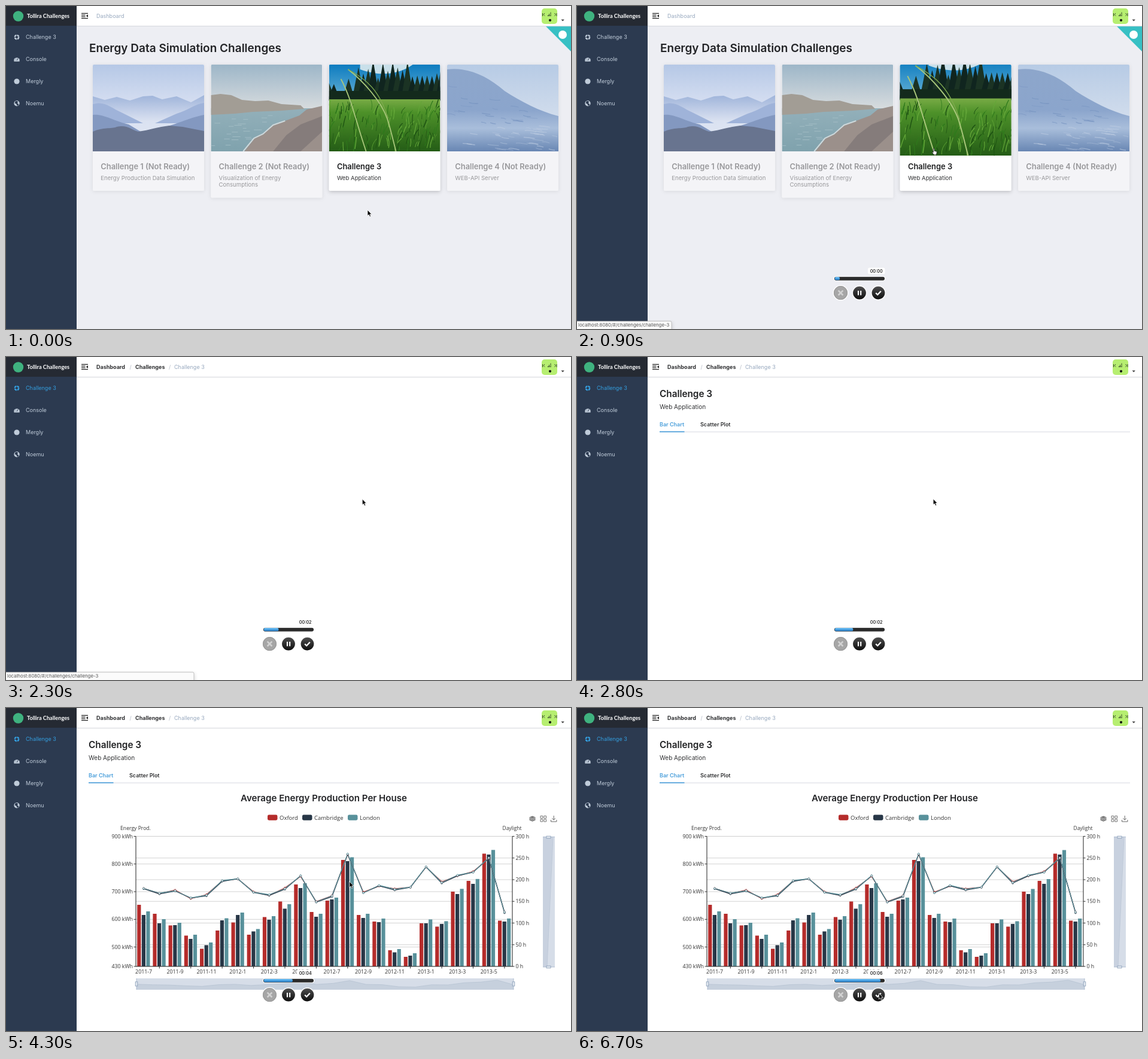
Recreate the animation shown at these times as an HTML page. Size 944x540 px, loop 6800 ms.

```html
<!DOCTYPE html>
<html lang="en">
<head>
<meta charset="utf-8">
<title>Energy dashboard</title>
<style>
html, body { margin: 0; width: 100%; height: 100%; overflow: hidden; background: #fff; }
svg { display: block; width: 944px; height: 540px; font-family: Inter, "Noto Sans CJK JP", sans-serif; }
.chart text { font-family: "Open Sans", sans-serif; }
</style>
</head>
<body>
<svg id="stage" viewBox="0 0 944 540" xmlns="http://www.w3.org/2000/svg"></svg>
<script>
const LOOP = 6800, STEP = 100;
const CHART_START = 2920, PAGE_SWAP = 2100, PAGE_IN = 2600;
const RED = '#b52c2b', NAVY = '#283747', TEAL = '#58919b';
const $ = id => document.getElementById(id);
const clamp = (v, a = 0, b = 1) => Math.min(b, Math.max(a, v));
const range = n => [...Array(n).keys()];

let seed = 7;
const rnd = (a = 0, b = 1) => {
  seed = (seed * 16807) % 2147483647;
  return a + (b - a) * seed / 2147483647;
};

// ---- markup helpers
const text = (x, y, str, size, fill, weight = 400, more = '') =>
  `<text x="${x}" y="${y}" font-size="${size}" fill="${fill}" font-weight="${weight}" ${more}>${str}</text>`;
const rect = (x, y, w, h, fill, more = '') =>
  `<rect x="${x}" y="${y}" width="${w}" height="${h}" fill="${fill}" ${more}/>`;
const circle = (x, y, r, fill, more = '') => `<circle cx="${x}" cy="${y}" r="${r}" fill="${fill}" ${more}/>`;
const path = (d, fill, more = '') => `<path d="${d}" fill="${fill}" ${more}/>`;
const line = (d, stroke, w = 1, more = '') => path(d, 'none', `stroke="${stroke}" stroke-width="${w}" ${more}`);
const group = (id, body, more = '') => `<g id="${id}" ${more}>${body}</g>`;
const gradient = (id, ...stops) =>
  `<linearGradient id="${id}" x1="0" y1="0" x2="0" y2="1">${stops.map(([o, c]) =>
    `<stop offset="${o}" stop-color="${c}"/>`).join('')}</linearGradient>`;
const clip = (id, x, y, w, h, more = '') => `<clipPath id="${id}">${rect(x, y, w, h, '#000', more)}</clipPath>`;
const shade = (id, dy, blur, alpha) =>
  `<filter id="${id}" x="-10%" y="-10%" width="120%" height="125%"><feDropShadow dx="0" dy="${dy}" stdDeviation="${blur}" flood-opacity="${alpha}"/></filter>`;

const defs = `<defs>
${gradient('haze', [0, '#b5c8e6'], [.4, '#d2dcf0'], [.75, '#dde4f2'], [1, '#aab8d4'])}
${gradient('mist', [0, '#9fb4da'], [1, '#dbe2f1'])}
${gradient('coastSky', [0, '#9db6c8'], [1, '#dcdfe0'])}
${gradient('sea', [0, '#93b0ba'], [1, '#7fa2ad'])}
${gradient('meadow', [0, '#78ab45'], [.25, '#4d9129'], [1, '#245c16'])}
${gradient('skyBlue', [0, '#0d7cc0'], [1, '#6db4d6'])}
${gradient('paleSky', [0, '#b7cbe5'], [1, '#e2e8f1'])}
${gradient('wave', [0, '#8da6cb'], [.5, '#8ba5cc'], [.72, '#a9bedb'], [1, '#6886b3'])}
${gradient('knob', [0, '#505050'], [1, '#0c0c0c'])}
${gradient('fillBlue', [0, '#6ec4fa'], [1, '#2279c4'])}
${clip('pic', 0, 0, 186, 145)}
${clip('reveal', 217, 190, 0, 260)}
${[211, 222.5].map(h => clip('card' + Math.floor(h), 0, 0, 186, h, 'rx="2"')).join('')}
${shade('soft', 1, 3, .09)}${shade('lift', 2, 3, .2)}
</defs>`;

// ---- sidebar and top bar
const menuIcon = {
  ring: c => circle(18, 52, 3.2, 'none', `stroke="${c}" stroke-width="2.4" stroke-dasharray="4 1.03"`),
  gauge: c => path('M13.4 92.8A4.9 4.9 0 1 1 22.6 92.8Z', c) + line('M18 91L20 87.5M15 90h.6M16 87.3h.6', '#2c3a50', 1),
  globe: c => circle(18, 162.8, 4.7, c) + path('M16 158.5l4 1-1 3 2.6 2.5-2.6 2-2-3.5-2.4-1Z', '#2c3a50')
};
const menu = color => menuIcon.ring(color) + text(33, 55.4, 'Challenge 3', 9, color);
const SIDE = '#bfcbd9';
const sidebar = rect(0, 0, 118, 540, '#2c3a50') + rect(0, 0, 118, 33, '#252a33') +
  circle(20.5, 17, 8.7, '#3fb27f') +
  text(35, 20, 'Tollira Challenges', 9.2, '#fff', 700, 'style="font-family:Lato,sans-serif"') +
  group('menuIdle', menu(SIDE)) + group('menuOn', menu('#349fe0')) +
  menuIcon.gauge(SIDE) + text(33, 92.4, 'Console', 9, SIDE) +
  circle(18, 126, 4.6, SIDE) + text(33, 129.3, 'Mergly', 9, SIDE) +
  menuIcon.globe(SIDE) + text(33, 166.1, 'Noemu', 9, SIDE);

const crumb = text(151, 20, 'Dashboard', 9, '#303133', 700) + text(206.5, 20, '/', 9, '#b4bac6') +
  text(216, 20, 'Challenges', 9, '#303133', 700) + text(272, 20, '/', 9, '#b4bac6') +
  text(281, 20, 'Challenge 3', 9, '#97a8be');
const avatar = rect(895, 4, 26, 26, '#b6ee70', 'rx="5"') +
  line('M896.5 12v5M900 12l-2 2.5 2 2M905.5 15.5v1.5M907.5 13v3M910 10.5v5M905 16.2h6M916.5 12l2 2.5-2 2M920 12v5', '#2c3a26', .9) +
  circle(909, 23.8, 2.1, '#111');
const topbar = rect(118, 0, 826, 33, '#fff') + rect(118, 33, 826, 1.2, '#d9dbe0') +
  line('M126 12.3H137M126 15.1H132.5M126 17.9H132.5M126 20.7H137', '#222', 1.3) +
  path('M137 13.9V19.1L133.8 16.5Z', '#222') +
  group('crumbHome', text(151, 20, 'Dashboard', 9, '#97a8be')) + group('crumbPage', crumb) +
  avatar + path('M927.5 22.5h5.4l-2.7 3Z', '#444');

// ---- simplified card pictures, 186 x 145 each
const hills = () => rect(0, 0, 186, 145, 'url(#haze)') +
  path('M0 53L20 59 40 54 62 60 84 53 100 52 116 58 140 53 164 63 186 51V95H0Z', 'url(#mist)') +
  path('M0 66C20 60 30 72 48 80L84 98H0ZM186 64C170 66 160 76 140 82L104 98H186Z', '#9fb3d9') +
  path('M0 84C18 82 34 94 60 100L80 112H0ZM186 84C164 88 150 96 122 104L96 112H186Z', '#8398c0') +
  path('M0 112C18 104 30 108 40 104C58 100 62 108 76 112C94 110 104 105 128 102L150 104 186 111V145H0Z', '#68748f');
const coast = () => rect(0, 0, 186, 80, 'url(#coastSky)') + rect(0, 73, 186, 72, 'url(#sea)') +
  path('M0 51L16 49 34 51 52 59 74 61 96 60 118 66 150 68 156 74 118 77 70 79 40 82 0 84Z', '#a29d95') +
  range(26).map(() => { const x = rnd(0, 105), y = rnd(82, 140);
    return line(`M${x} ${y}h${rnd(4, 14)}`, '#a8c0c8', .8); }).join('') +
  path('M186 69L160 75 148 85 124 94 104 100 88 115 74 122 56 145H186Z', '#9b908b') +
  line('M124 94L104 101 87 116 72 123 54 145', '#cdd8db', 2) +
  path('M186 86L150 100 126 118 104 145H150L186 112Z', '#857c7b');
const grass = () => rect(0, 0, 186, 62, 'url(#skyBlue)') +
  path('M52 0H140C120 14 90 22 52 8Z', '#c9e0ea') +
  range(24).map(i => { const x = i * 8.2, h = rnd(2, 34) - (x > 70 ? 12 : 0) + (x < 45 ? 18 : 0);
    return path(`M${x} ${h}L${x + 11} 60H${x - 11}Z`, i % 2 ? '#10251f' : '#1b3324'); }).join('') +
  rect(0, 44, 186, 16, '#132a1c') + rect(0, 58, 186, 87, 'url(#meadow)') +
  range(150).map(i => { const x = rnd(-5, 186), y = rnd(74, 150), h = rnd(8, 22);
    return line(`M${x} ${y}q${rnd(-1, 3)} ${-h / 2} ${rnd(-3, 8)} ${-h}`, ['#2f7a1c', '#63a738', '#1d5212'][i % 3], rnd(.6, 1.5)); }).join('') +
  line('M20 24C38 58 44 92 62 145M32 8C58 28 88 62 98 92C104 112 108 130 112 145', '#a9c77b', 1.8) +
  line('M32 8C62 24 84 42 99 90', '#7fa94f', 1.2);
const surf = () => rect(0, 0, 186, 145, 'url(#paleSky)') +
  path('M0 8C34 4 66 18 96 44C124 62 154 78 186 86V145H0Z', 'url(#wave)') +
  range(60).map(() => { const x = rnd(0, 180), y = rnd(18 + x * .48, 142);
    return line(`M${x} ${y}q5 ${rnd(-2, 3)} ${rnd(8, 20)} 2`, y > 100 ? '#bccce2' : '#7491bf', rnd(.6, 1.6), 'opacity=".6"'); }).join('');

const cards = [
  [145, 211, 'Challenge 1 (Not Ready)', ['Energy Production Data Simulation'], hills],
  [342.3, 222.5, 'Challenge 2 (Not Ready)', ['Visualization of Energy', 'Consumptions'], coast],
  [539.6, 211, 'Challenge 3', ['Web Application'], grass],
  [737, 211, 'Challenge 4 (Not Ready)', ['WEB-API Server'], surf]
].map(([x, h, title, lines, photo], i) => {
  const on = i === 2;
  return `<g transform="translate(${x} 98)">` +
    rect(0, 0, 186, h, on ? '#fff' : '#f4f4f7', `rx="2" filter="url(#${on ? 'lift' : 'soft'})"`) +
    `<g clip-path="url(#card${Math.floor(h)})"><g id="photo${i}"><g clip-path="url(#pic)">${photo()}</g></g></g>` +
    text(13.3, 174.5, title, 12.9, on ? '#1f2022' : '#98989b', 600) +
    lines.map((s, k) => text(13.3, 193 + k * 11, s, 9.6, on ? '#303133' : '#98989b')).join('') + '</g>';
}).join('');

const home = rect(118, 33, 826, 507, '#edeef3') +
  text(139, 76.5, 'Energy Data Simulation Challenges', 19, '#222326', 600) + cards +
  path('M902 34H944V76Z', '#37c0c4') + circle(930, 48, 7, '#fff');

// ---- chart
const LEFT = 217, RIGHT = 846, TOP = 214.5, BASE = 432, BAND = (RIGHT - LEFT) / 24;
const center = i => LEFT + BAND * (i + .5);
const series = [
  ['Oxford', RED, 437, -10.9, [329, 344, 363.5, 380.5, 402.5, 372, 358.5, 379, 349.5, 323.5, 295, 341, 322, 254, 346, 357, 405, 416, 360, 365.5, 307, 289, 243.5, 355.5]],
  ['Cambridge', NAVY, 495, -3.3, [346, 360, 363, 386, 396.5, 355, 346, 373.5, 354, 335.5, 301, 349, 320, 256, 351, 358, 408.5, 414, 360, 361, 311, 294, 245, 357]],
  ['London', TEAL, 571, 4.2, [340, 353, 359, 379, 392, 351.5, 342, 369.5, 348, 328, 293, 344, 317, 249.5, 344, 352, 403, 410, 353.5, 356.5, 302.5, 286, 237.5, 352]]
];
const daylight = [301.5, 309.5, 305.5, 317.5, 313, 288.5, 285.5, 308, 312, 302, 280.5, 324, 314, 244, 309, 296.5, 303, 299.5, 265.5, 291.5, 279.5, 274.5, 250.5, 341];
const sun = (i, s) => daylight[i] + [1.2 * Math.sin(i * 2.6), .7 + .7 * Math.sin(i * 1.7), 0][s];
const sunPath = s => 'M' + range(24).map(i => `${center(i)} ${sun(i, s)}`).join('L');
const axisText = (x, y, s, anchor) => text(x, y, s, 8.8, '#333', 400, `text-anchor="${anchor}"`);

const leftAxis = [900, 800, 700, 600, 500, 430].map(v => [v, BASE - (v - 430) * (BASE - TOP) / 470]);
const rightAxis = range(7).map(i => [i * 50, BASE - i * 36.25]);
const axes = [...leftAxis, ...rightAxis].map(([, y]) => line(`M${LEFT} ${y}H${RIGHT}`, '#cfcfcf', .9)).join('');
const scales = leftAxis.map(([v, y]) => axisText(212, y + 3.1, v + ' kWh', 'end') + line(`M213.5 ${y}H217`, '#333')).join('') +
  rightAxis.map(([v, y]) => axisText(851.5, y + 3.1, v + ' h', 'start') + line(`M846 ${y}H849.5`, '#333')).join('') +
  range(12).map(k => {
    const month = 6 + k * 2;
    return axisText(center(k * 2), 444, `${2011 + Math.floor(month / 12)}-${month % 12 + 1}`, 'middle') +
      line(`M${center(k * 2 + 1)} ${BASE}v3.5`, '#333');
  }).join('') +
  line(`M${LEFT} ${TOP}V${BASE}H${RIGHT}V${TOP}`, '#333', 1.1) +
  text(216.5, 204, 'Energy Prod.', 8.6, '#333', 400, 'text-anchor="middle"') +
  text(845.5, 204, 'Daylight', 8.4, '#333', 400, 'text-anchor="middle"');

const legend = series.map(([name, color, x]) =>
  rect(x, 178.5, 16.5, 9.2, color, 'rx="2.4"') + text(x + 20, 186.6, name, 9.5, '#333')).join('');
const tools = path('M874.5 182.6L879.5 180.4 884.5 182.6V187.4L879.5 189.8 874.5 187.4Z', '#777') +
  line('M874.5 182.8L879.5 185 884.5 182.8M874.5 185.2L879.5 187.4 884.5 185.2', '#eee', .7) +
  line('M893 180.5h3.8v3.8h-3.8ZM898.8 180.5h3.8v3.8h-3.8ZM893 186.2h3.8v3.8h-3.8ZM898.8 186.2h3.8v3.8h-3.8Z', '#666', .9) +
  line('M910.5 187v3h9.4v-3M915.2 180v7M912.4 184.4l2.8 2.8 2.8-2.8', '#666', 1);
const shadow = series[2][4].map((y, i) => `${218 + i * 630 / 23} ${(466.5 - (410 - y) * .067).toFixed(1)}`).join('L');
const grip = (x, y, w, h) => rect(x - w / 2, y - h / 2, w, h, '#e3e9f1', 'stroke="#8fa2bb" stroke-width=".9"');
const sliders = rect(218, 452, 630, 19, '#d6dde8') + path(`M218 471L${shadow}L848 471Z`, '#c6d0dd') +
  line('M' + shadow, '#b3c0d0', .7) +
  line('M218 452V471M848 452V471', '#a7b7cc', .9) + grip(218, 461.3, 3.6, 7) + grip(848, 461.3, 3.6, 7) +
  rect(897, 215.5, 20, 217.5, '#d6dde8') + path('M897 215.5H914L904 433H897Z', '#c8d1df') +
  line('M914 217L904 433', '#b9c5d5', .7) + line('M897 215.5H917M897 433H917', '#a7b7cc', .9) +
  grip(906.5, 216, 7, 3.6) + grip(906.5, 433, 7, 3.6);

const bars = series.map(([, color, , dx], s) => range(24).map(i =>
  rect((center(i) + dx).toFixed(1), BASE, 6.2, 0, color, `id="bar${s}_${i}"`)).join('')).join('');
const lines = series.map(([, color], s) => line(sunPath(s), color, 1.3, 'stroke-linejoin="round"')).join('');
const dots = range(24).map(i => group('dot' + i, [1, 2].map(s =>
  circle(center(i), sun(i, s) + (s === 1 ? 1 : -1), .75, NAVY)).join(''))).join('');
const rings = range(24).map(i => [0, 1, 2].map(s =>
  circle(center(i), sun(i, s), 1.5, '#fff', `class="ring" stroke="${series[s][1]}" stroke-width=".9"`)).join('')).join('');

const heading = text(138, 67.3, 'Challenge 3', 15.3, '#1f2022', 600) + text(138, 87, 'Web Application', 10, '#303133') +
  text(138, 116.2, 'Bar Chart', 9, '#4a9fdb', 600) + text(206, 116.2, 'Scatter Plot', 9, '#303133', 600) +
  rect(138, 124.6, 786, 1.2, '#dcdfe5') + rect(138, 124.2, 41.5, 1.6, '#4a9fdb');
const chart = text(531, 156, 'Average Energy Production Per House', 15.1, '#222326', 600, 'text-anchor="middle"') +
  `<g class="chart">${legend}${axes}${bars}${scales}</g>` + tools + sliders +
  `<g clip-path="url(#reveal)">${lines}</g>` + dots + rings;
const detail = rect(118, 33, 826, 507, '#fff') + group('heading', heading) + group('chart', chart);

// ---- recorder controls, status box, pointer
const knob = (x, r, fill, mark) => circle(x, 479.6, r, fill, 'stroke="#fff" stroke-width="1.4"') + mark;
const recorder = rect(486, 437.6, 28.5, 10.6, '#fff', 'rx="3"') +
  text(500.2, 445.5, '00:00', 7.3, '#111', 500, 'id="clock" text-anchor="middle"') +
  rect(429.4, 452.2, 85.2, 7, '#2b2b2b', 'rx="3.5" stroke="#fff" stroke-width="1.1"') +
  rect(430.6, 453.1, 0, 5.2, 'url(#fillBlue)', 'id="progress" rx="2.4"') +
  knob(440.5, 12.2, '#a6a6a6', circle(440.5, 479.6, 11, 'none', 'stroke="#969696"') + line('M436.6 475.7l7.8 7.8M444.4 475.7l-7.8 7.8', '#d2d2d2', 2.6)) +
  knob(472, 11.6, 'url(#knob)', line('M470 476v7.4M474.2 476v7.4', '#fff', 2.1)) +
  knob(503.5, 11.6, 'url(#knob)', line('M499.2 479.7l3 3 5.6-6', '#fff', 2.3));
const status = rect(-3, 527, 161, 16, '#fbfbfb', 'id="statusBox" rx="2" stroke="#b0b0b0" stroke-width=".8" filter="url(#lift)"') +
  text(2, 536.3, '', 7.8, '#555', 400, 'id="statusText"');
const pointer = group('arrow', path('M0 0V9.8L2.2 7.8 3.8 11.3 5.6 10.5 4 7.2H7Z', '#000', 'stroke="#fff" stroke-width=".8"')) +
  group('hand', path('M-.2 1C-.2-.3 1.6-.3 1.6 1V4.2L4.8 5C5.8 5.3 5.9 6 5.7 7L5 10.8H.8L-1.8 7.2C-2.4 6.1-1 5.6-.2 6.8Z', '#fff', 'stroke="#111" stroke-width=".8"'));

$('stage').innerHTML = defs + group('home', home) + group('detail', detail) + topbar + sidebar +
  rect(0, 0, 0, 1.4, '#2299dd', 'id="loadBar"') + group('recorder', recorder) +
  group('status', status) + group('pointer', pointer);

// ---- motion
const smooth = k => k * k * (3 - 2 * k);
const elastic = k => k <= 0 ? 0 : k >= 1 ? 1 : 1 + 2 ** (-10 * k) * Math.sin((k - .1) * 5 * Math.PI);
const track = (keys, t) => {
  let a = keys[0];
  for (const b of keys) {
    if (t < b[0]) {
      const k = smooth((t - a[0]) / (b[0] - a[0]));
      return a.slice(1).map((v, i) => v + (b[i + 1] - v) * k);
    }
    a = b;
  }
  return a.slice(1);
};
const show = (id, on) => $(id).setAttribute('visibility', on ? 'inherit' : 'hidden');
const set = (id, attr, v) => $(id).setAttribute(attr, v);
const POINTER = [[0, 604, 341], [600, 595.5, 238], [4000, 595, 237], [5000, 497, 483], [5300, 497, 483], [6100, 504.5, 477]];
const LOAD = [[1400, 0], [1700, 54], [1900, 180], [2050, 944]];
const ringNodes = document.querySelectorAll('.ring');

function drawChart(t) {
  const age = t - CHART_START;
  show('chart', age >= 0);
  if (age < 0) return;
  series.forEach(([, , , , tops], s) => tops.forEach((top, i) => {
    const h = Math.max(0, (BASE - top) * elastic((age - i * 10 - s * 100) / 1000));
    set(`bar${s}_${i}`, 'y', BASE - h);
    set(`bar${s}_${i}`, 'height', h);
  }));
  const k = clamp(age / 1000), edge = LEFT + (RIGHT - LEFT) * k;
  $('reveal').firstChild.setAttribute('width', edge - LEFT + (k === 1 ? 4 : 0));
  range(24).forEach(i => show('dot' + i, center(i) > edge));
  const r = 1.5 * clamp((age - 980) / 200);
  ringNodes.forEach(n => { n.setAttribute('r', r); n.setAttribute('stroke-width', r ? .9 : 0); });
}

function draw(t) {
  const onPage = t >= PAGE_SWAP;
  show('home', !onPage); show('detail', onPage);
  show('menuIdle', !onPage); show('menuOn', onPage);
  show('crumbHome', !onPage); show('crumbPage', onPage);
  const zoom = 1 + .1 * smooth(clamp((t - 250) / 300));
  set('photo2', 'transform', `translate(93 72.5) scale(${zoom}) translate(-93 -72.5)`);
  set('heading', 'opacity', clamp((t - PAGE_IN + 100) / 200));
  if (onPage) drawChart(t); else show('chart', false);

  set('loadBar', 'width', onPage ? 0 : track(LOAD, t)[0]);
  show('recorder', t >= 300);
  $('clock').textContent = '00:0' + Math.max(0, Math.floor((t - 250) / 1000));
  set('progress', 'width', clamp(.01172 * t - 2, 0, 82.6));

  const waiting = t >= 1500 && t < 2000;
  show('status', t >= 400 && t < 2600);
  set('statusBox', 'width', t >= 1500 ? 317 : 161);
  $('statusText').textContent = waiting ? 'localhost を待機しています...' : 'localhost:8080/#/challenges/challenge-3';
  set('statusText', 'font-size', waiting ? 7.6 : 7.8);

  const [x, y] = track(POINTER, t), hovering = t >= 300 && !onPage;
  set('pointer', 'transform', `translate(${x} ${y})`);
  show('hand', hovering); show('arrow', !hovering);
}

const start = performance.now();
function tick() {
  const t = (performance.now() - start) % LOOP;
  draw(Math.floor(t / STEP) * STEP);
  requestAnimationFrame(tick);
}
tick();
</script>
</body>
</html>
```
